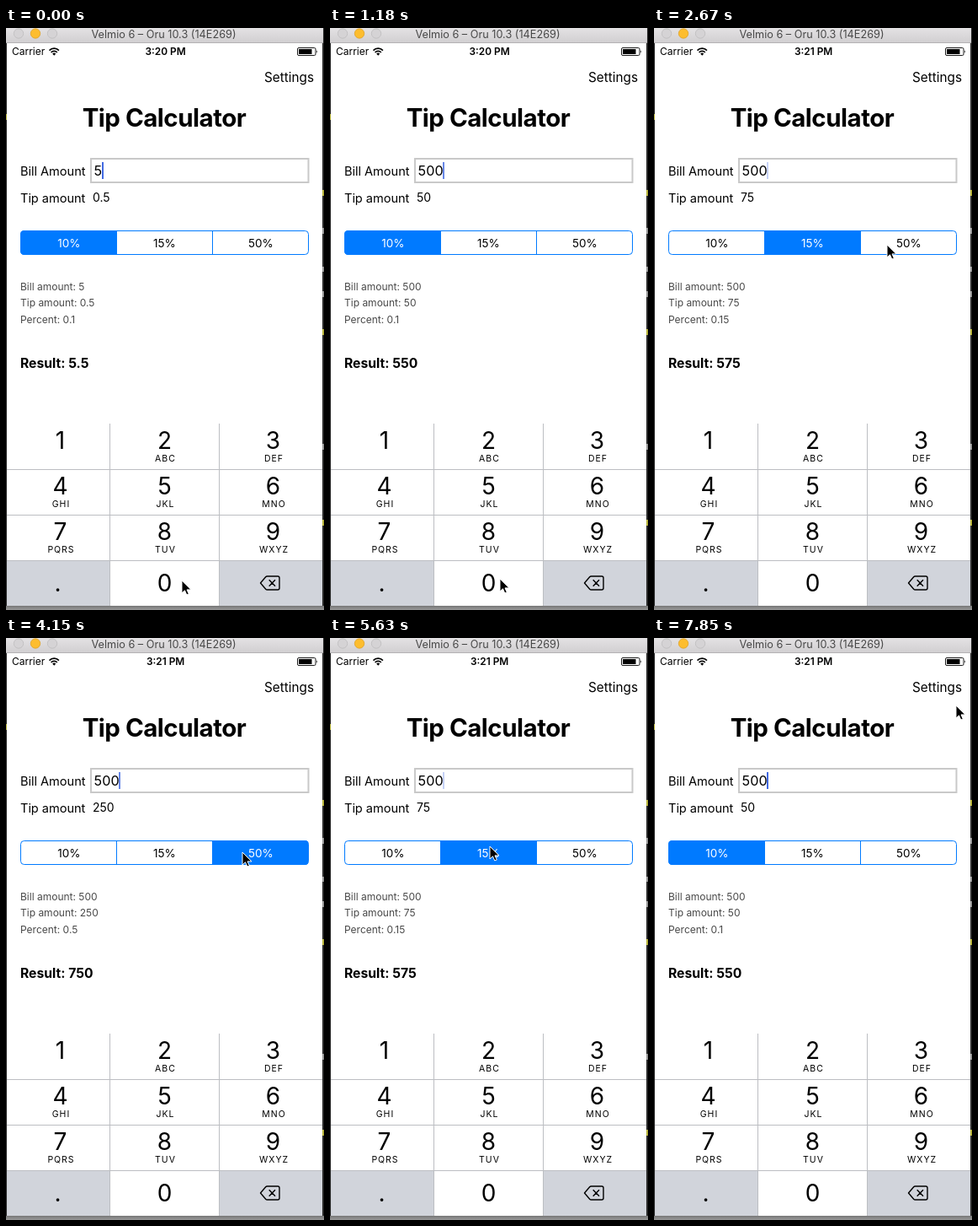
An HTML page for the animation above (8 s loop, 378 px wide and 690 px high).

```html
<!DOCTYPE html>
<html lang="en">
<head>
<meta charset="utf-8">
<title>Tip Calculator</title>
<style>
  html, body { margin: 0; width: 100%; height: 100%; overflow: hidden; background: #fff; }
  svg { display: block; width: 378px; height: 690px; }
  text { font-family: Inter, Roboto, sans-serif; fill: #000; white-space: pre; }
  .mid { text-anchor: middle; }
  .label { font-size: 14.6px; letter-spacing: -.04px; }
  .small { font-size: 12px; fill: #484848; }
  .seg { font-size: 13.5px; }
  .digit { font-size: 28px; }
  .letters { font-size: 10.5px; letter-spacing: 1px; }
</style>
</head>
<body>
<svg viewBox="0 0 378 690">
  <defs>
    <linearGradient id="bar" x2="0" y2="1">
      <stop stop-color="#e4e2e4"/><stop offset="1" stop-color="#d1cfd1"/>
    </linearGradient>
    <linearGradient id="shadow" x2="0" y2="1">
      <stop stop-color="#777"/><stop offset="1" stop-color="#999"/>
    </linearGradient>
    <clipPath id="segments"><rect x="17" y="240" width="343" height="29" rx="4.5"/></clipPath>
  </defs>

  <!-- window -->
  <rect width="378" height="690" fill="#2b2b2b"/>
  <rect y="685" width="378" height="5" fill="url(#shadow)"/>
  <g fill="#b9b53c">
    <rect y="102" width="1" height="7"/><rect x="376" y="192" width="2" height="7"/>
    <rect x="376" y="357" width="2" height="7"/><rect x="376" y="583" width="2" height="7"/>
  </g>
  <g fill="#999">
    <rect x="376" y="237" width="2" height="7"/><rect x="376" y="283" width="2" height="6"/>
    <rect x="376" y="312" width="2" height="7"/><rect x="376" y="493" width="2" height="7"/>
  </g>
  <rect x="1" y="17" width="375" height="668" fill="#fff"/>
  <rect width="377" height="17" fill="url(#bar)"/>
  <rect y="17" width="377" height="1" fill="#b4b2b4"/>
  <g stroke-width=".8">
    <circle cx="15" cy="6.5" r="5.7" fill="#d5d3d5" stroke="#bdbbbd"/>
    <circle cx="35" cy="6.5" r="5.7" fill="#fdbd2e" stroke="#dfa023"/>
    <circle cx="55" cy="6.5" r="5.7" fill="#d5d3d5" stroke="#bdbbbd"/>
  </g>
  <text class="mid" x="187.5" y="11.5" font-size="12.7" style="fill:#484848">Velmio 6 – Oru 10.3 (14E269)</text>

  <!-- status bar -->
  <text x="7" y="32.3" font-size="12">Carrier</text>
  <g fill="none" stroke="#000" stroke-width="1.7">
    <path d="M51.5 26.6a8 8 0 0 1 11.4 0M53.6 29a5 5 0 0 1 7.2 0"/>
    <path d="M57.2 32.8l-2-2.2a2.8 2.8 0 0 1 4 0z" fill="#000" stroke="none"/>
  </g>
  <text class="mid" id="clock" x="189.6" y="32.3" font-size="11.9" font-weight="600"></text>
  <rect x="346.5" y="23.5" width="21.5" height="9" rx="1.5" fill="none" stroke="#000" stroke-width=".9"/>
  <rect x="348" y="25" width="15.5" height="6" fill="#000"/>
  <path d="M369 26.3q1.8 1.7 0 3.4z"/>

  <!-- form -->
  <text x="366" y="63.5" text-anchor="end" font-size="15.3">Settings</text>
  <text class="mid" x="188" y="117" font-size="29.5" font-weight="700" letter-spacing="-.5">Tip Calculator</text>
  <text class="label" x="17" y="175">Bill Amount</text>
  <rect x="101" y="155" width="258.5" height="28" fill="#fff" stroke="#c9c9c9" stroke-width="2"/>
  <text id="bill" x="104.6" y="175" font-size="16.2"></text>
  <rect id="caret" y="159" width="2" height="20" fill="#4169e1"/>
  <text class="label" x="17" y="206.5">Tip amount</text>
  <text id="tip" x="103" y="206.3" font-size="14"></text>

  <g clip-path="url(#segments)"><rect id="chosen" y="240" width="114.5" height="29" fill="#007aff"/></g>
  <path d="M131.5 240.5v28M245.5 240.5v28" stroke="#007aff"/>
  <rect x="17.5" y="240.5" width="342" height="28" rx="4" fill="none" stroke="#007aff"/>
  <g id="options"></g>

  <text class="small" id="billLine" x="17" y="310.5"></text>
  <text class="small" id="tipLine" x="17" y="330"></text>
  <text class="small" id="percentLine" x="17" y="349.5"></text>
  <text id="result" x="17" y="403" font-size="15.7" font-weight="700"></text>

  <!-- keypad -->
  <path d="M1 631.5h122.5v53.5H1zM253.5 631.5H376v53.5H253.5z" fill="#d1d4db"/>
  <rect id="zero" x="123.5" y="631.5" width="130" height="53.5" fill="#d1d4db"/>
  <path d="M123.5 469v216M253.5 469v216M1 523.5h375M1 577.5h375M1 631.5h375" stroke="#bcbec2"/>
  <g id="keys"></g>
  <path d="M302.5 658l6.2-7.2q.7-.8 1.8-.8H323q2 0 2 2v12q0 2-2 2h-12.500q-1.100 0-1.800-.8zM312.700 654.200l7.300 7.600m0-7.600l-7.300 7.600"
        fill="none" stroke="#000" stroke-width="1.4" stroke-linejoin="round"/>

  <path id="pointer" d="M0 0V15l3.500-3.200 2.300 5.200 2.500-1.100-2.300-5H11z" stroke="#fff" stroke-width="1" stroke-linejoin="round"/>
</svg>
<script>
const LOOP = 8000, TICK = 148.3;
const $ = id => document.getElementById(id);
const NS = 'http://www.w3.org/2000/svg';

function addText(parent, cls, x, y, content) {
  const el = document.createElementNS(NS, 'text');
  el.setAttribute('class', 'mid ' + cls);
  el.setAttribute('x', x);
  el.setAttribute('y', y);
  el.textContent = content;
  parent.appendChild(el);
  return el;
}

const columns = [64.5, 188.5, 317.5];
['', 'ABC', 'DEF', 'GHI', 'JKL', 'MNO', 'PQRS', 'TUV', 'WXYZ'].forEach((letters, i) => {
  const x = columns[i % 3], y = 499 + 54 * Math.floor(i / 3);
  addText($('keys'), 'digit', x, y, i + 1);
  addText($('keys'), 'letters', x + 1, y + 15, letters);
});
addText($('keys'), 'digit', 188.5, 668, 0);
addText($('keys'), 'digit', 61.5, 667.5, '.');

const percents = [0.1, 0.15, 0.5];
const options = percents.map((p, i) =>
  addText($('options'), 'seg', [75, 188.5, 303][i], 260, Math.round(p * 100) + '%'));

// Each entry is [tick, value...]; a value holds until the next entry.
const bills = [[0, 5], [2, 50], [4, 500]];
const pressed = [[0, false], [1, true], [2, false], [3, true], [4, false]];
const choices = [[0, 0], [15, 1], [23, 2], [36, 1], [46, 0]];
const clocks = [[0, '3:20 PM'], [16, '3:21 PM']];
const pointerPath = [
  [0, 209, 655], [1, 206, 654], [2, 202, 653],
  [9, 214, 580], [10, 232, 420], [11, 214, 290], [12, 202, 262],
  [16, 207, 261], [17, 243, 259], [18, 277, 257], [19, 283, 256],
  [28, 281, 254], [29, 279, 254], [31, 262, 253], [32, 212, 250], [33, 190, 248],
  [38, 190, 247], [39, 180, 249], [40, 152, 252], [41, 118, 254], [42, 104, 254],
  [51, 120, 243], [52, 255, 150], [53, 359, 80]
];
const fadeOut = [8, 14, 21, 28, 35, 42, 48];
const fadeIn = [11, 18, 24, 31, 38, 45, 52];
const blinks = [[0, 1]];
fadeOut.forEach((out, i) =>
  blinks.push([out, 0.8], [out + 1, 0], [fadeIn[i], 0.3], [fadeIn[i] + 1, 1]));

const at = (track, tick) => track.filter(entry => entry[0] <= tick).pop();
const valueAt = (track, tick) => at(track, tick)[1];

function render(time) {
  const tick = Math.floor((time % LOOP + 12) / TICK);
  const bill = valueAt(bills, tick), choice = valueAt(choices, tick);
  const percent = percents[choice];
  const tip = +(bill * percent).toFixed(2);

  $('clock').textContent = valueAt(clocks, tick);
  $('bill').textContent = bill;
  $('tip').textContent = tip;
  $('billLine').textContent = 'Bill amount: ' + bill;
  $('tipLine').textContent = 'Tip amount: ' + tip;
  $('percentLine').textContent = 'Percent: ' + percent;
  $('result').textContent = 'Result: ' + (bill + tip);

  $('caret').setAttribute('x', 104 + 10 * String(bill).length);
  $('caret').setAttribute('opacity', valueAt(blinks, tick));
  $('chosen').setAttribute('x', 17 + 114 * choice);
  options.forEach((el, i) => { el.style.fill = i === choice ? '#fff' : '#000'; });
  $('zero').setAttribute('visibility', valueAt(pressed, tick) ? 'visible' : 'hidden');

  const [, x, y] = at(pointerPath, tick);
  $('pointer').setAttribute('transform', `translate(${x} ${y})`);
}

const start = performance.now();
function frame() {
  render(performance.now() - start);
  requestAnimationFrame(frame);
}
frame();
</script>
</body>
</html>
```
